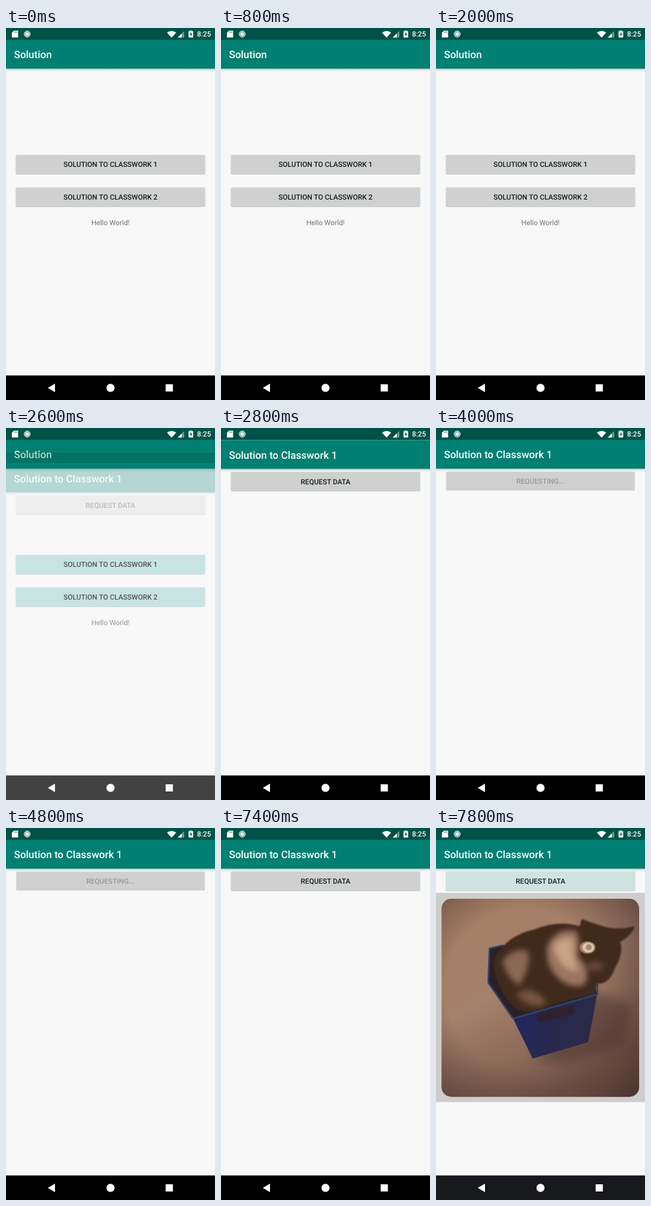
An HTML page that plays this animation: 320 px wide and 568 px high, repeating every 8 s.

```html
<!DOCTYPE html>
<html lang="en">
<head>
<meta charset="utf-8">
<title>Classwork app</title>
<style>
  html, body { margin: 0; width: 100%; height: 100%; overflow: hidden; background: #f8f8f8; }
  svg { display: block; width: 100vw; height: 100vh; }
  text { font-family: Roboto, "Noto Sans", sans-serif; font-size: 10.89px; text-rendering: geometricPrecision; }
  .title { font-size: 15.7px; font-weight: 500; fill: #fff; }
  .label { font-weight: 500; text-anchor: middle; fill: #141c1e; }
  .plain { text-anchor: middle; fill: #707373; }
  .clock { font-weight: 500; fill: #fff; }
</style>
</head>
<body>
<svg viewBox="0 0 320 568">
  <defs>
    <linearGradient id="barShadow" x2="0" y2="1">
      <stop stop-color="#000" stop-opacity=".26"/>
      <stop offset=".4" stop-color="#000" stop-opacity=".08"/>
      <stop offset="1" stop-color="#000" stop-opacity="0"/>
    </linearGradient>
    <linearGradient id="carpet" x2=".5" y2="1">
      <stop stop-color="#a47d62"/>
      <stop offset=".5" stop-color="#a5806a"/>
      <stop offset="1" stop-color="#7a594c"/>
    </linearGradient>
    <radialGradient id="vignette" cx=".42" cy=".45" r=".8">
      <stop offset=".5" stop-color="#321f20" stop-opacity="0"/>
      <stop offset="1" stop-color="#321f20" stop-opacity=".65"/>
    </radialGradient>
    <linearGradient id="bin" x2="1" y2=".3">
      <stop stop-color="#252566"/>
      <stop offset=".55" stop-color="#272850"/>
      <stop offset="1" stop-color="#2b2a46"/>
    </linearGradient>
    <filter id="soft" x="-30%" y="-30%" width="160%" height="160%"><feGaussianBlur stdDeviation="9"/></filter>
    <filter id="fur" x="-20%" y="-20%" width="140%" height="140%"><feGaussianBlur stdDeviation="1.2"/></filter>
    <filter id="tuft" x="-40%" y="-40%" width="180%" height="180%"><feGaussianBlur stdDeviation="4"/></filter>
    <clipPath id="photoFrame"><rect x="8.5" y="108" width="302.5" height="302.5" rx="15"/></clipPath>
  </defs>

  <g id="home"></g>
  <rect id="navBack" y="530.5" width="320" height="37.5" fill="#000"/>
  <g id="detail"></g>
  <g id="photo">
    <rect y="99" width="320" height="319.5" fill="#cfcdcb"/>
    <g clip-path="url(#photoFrame)">
      <rect x="8" y="108" width="304" height="304" fill="url(#carpet)"/>
      <rect x="8" y="108" width="304" height="304" fill="url(#vignette)"/>
      <path d="M240 250L300 270L290 330L200 360L150 356Z" fill="#3a2728" opacity=".45" filter="url(#soft)"/>
      <path d="M82 184L104 179L240 232L247 254L118 291L80 236Z" fill="#2b2028"/>
      <path d="M89 200Q108 164 150 155Q188 140 220 150L223 139L246 147Q276 158 304 150Q300 164 282 174Q288 190 274 214Q266 238 247 238L242 254Q190 264 150 280Q118 284 103 252Q86 226 89 200Z" fill="#40291f" filter="url(#fur)"/>
      <g filter="url(#tuft)">
        <path d="M172 176Q188 151 215 158Q222 176 217 196Q240 218 226 240Q196 246 178 218Q166 198 172 176Z" fill="#9c7660"/>
        <path d="M180 180Q194 164 210 170Q208 198 218 218Q190 218 180 180Z" fill="#c8a284"/>
        <path d="M102 202Q120 182 141 188Q145 212 128 240Q108 230 102 202Z" fill="#8a6852"/>
        <path d="M123 254Q146 236 170 267Q146 280 123 254Z" fill="#76543f"/>
        <ellipse cx="244" cy="211" rx="12" ry="7" fill="#6b4a3a"/>
      </g>
      <ellipse cx="232" cy="182.5" rx="12" ry="9.5" fill="#a58068"/>
      <ellipse cx="233" cy="182.5" rx="9" ry="7.5" fill="#dcc6ae"/>
      <circle cx="234" cy="182" r="4.5" fill="#a5886f"/>
      <path d="M118 291L247 252L233 327L148 352Z" fill="url(#bin)"/>
      <path d="M118 291L80 236L82 184L103 179M118 291L247 254V236" fill="none" stroke="#2f4468" stroke-width="2.5" stroke-linejoin="round"/>
      <rect x="154" y="276" width="59" height="15" rx="6" transform="rotate(-14 183 284)" fill="#2e2230"/>
    </g>
  </g>

  <g fill="#fff">
    <rect width="320" height="18" fill="#005248"/>
    <path d="M12.2 4H18.5V14.5H9V7.2Z"/>
    <path d="M12.8 5.2V7.2M14.6 5.2V7.2M16.4 5.2V7.2" stroke="#005248" stroke-width=".8"/>
    <circle cx="32.5" cy="9.3" r="4.7" fill="#7fa9a3" stroke="#e2ecea"/>
    <circle cx="32.5" cy="9.3" r="2.8" fill="#e2ecea"/>
    <path d="M246.5 7Q253.5 2 260.5 7L253.5 14.8Z"/>
    <path d="M273 4.5V14.5H263Z" opacity=".4"/>
    <path d="M269 8.5V14.5H263Z"/>
    <path d="M281.5 4.8V3.8H284.5V4.8H286.5V14.5H279.5V4.8Z"/>
    <path d="M283.7 6L281 10H282.7V13L285.2 9H283.7Z" fill="#005248"/>
    <text class="clock" x="292.5" y="13.2">8:25</text>
    <path d="M75 543V556L64 549.5Z"/>
    <circle cx="160" cy="549.5" r="6.2"/>
    <rect x="244.5" y="544" width="11" height="11"/>
  </g>
</svg>
<script>
const LOOP = 8000, STEP = 200;
const $ = id => document.getElementById(id);

const button = (id, y, label) => `
  <g id="${id}">
    <g class="shadow">
      <rect x="14.5" y="${y - .5}" width="291" height="30" rx="2" fill="#d3e4e4"/>
      <rect x="15.5" y="${y + 27.6}" width="289" height="1.8" rx="1" fill="#b9c8c9"/>
    </g>
    <rect class="face" x="15.5" y="${y}" width="289" height="28.6" rx="1.5" fill="#d0d0d0"/>
    <text class="label" x="160" y="${y + 18.4}">${label}</text>
  </g>`;

const screen = (title, content) => `
  <rect width="320" height="568" fill="#f8f8f8"/>
  <rect y="62" width="320" height="5" fill="url(#barShadow)"/>
  ${content}
  <rect width="320" height="18" fill="#005248"/>
  <rect y="18" width="320" height="44" fill="#008072"/>
  <text class="title" x="12.2" y="46.2">${title}</text>`;

$("home").innerHTML = screen("Solution",
  button("first", 194, "SOLUTION TO CLASSWORK 1") +
  button("second", 243.8, "SOLUTION TO CLASSWORK 2") +
  '<text class="plain" x="160" y="300.8">Hello World!</text>');
$("detail").innerHTML = screen("Solution to Classwork 1", button("request", 66.8, "REQUEST DATA"));

const part = (id, selector) => $(id).querySelector(selector);
const face = id => part(id, ".face");
const requestLabel = part("request", "text");
const between = (t, from, to) => t >= from && t < to;
const decelerate = (t, duration, power) =>
  1 - (1 - Math.min(1, Math.max(0, t / duration))) ** power;

function render(time) {
  const t = Math.floor(time / STEP) * STEP;
  const opening = t - 2585;
  const opened = opening >= STEP;
  const waiting = between(t, 4000, 7400);
  const loaded = t >= 7600;

  $("detail").setAttribute("opacity", decelerate(opening, 200, 4));
  $("detail").setAttribute("transform", `translate(0 ${45.4 * (1 - decelerate(opening, 350, 5))})`);

  const homeFace = opening > 0 ? "#b6ddda" : "#d0d0d0";
  face("first").setAttribute("fill", between(t, 2200, 2600) ? "#c6c8c8" : homeFace);
  face("second").setAttribute("fill", homeFace);

  requestLabel.textContent = waiting ? "REQUESTING..." : "REQUEST DATA";
  requestLabel.style.fill = waiting ? "#8f9a9a" : "";
  part("request", ".shadow").setAttribute("visibility", waiting ? "hidden" : "inherit");
  face("request").setAttribute("fill",
    loaded ? "#cfe4e1" : between(t, 3800, 4000) ? "#c6c8c8" : "#d0d0d0");

  $("photo").setAttribute("visibility", loaded ? "visible" : "hidden");
  $("navBack").setAttribute("fill", loaded ? "#18191c" : "#000");
  // Once open, the new window sits behind the navigation bar.
  $(opened ? "detail" : "home").after($("navBack"));
}

function tick(now) {
  render(now % LOOP);
  requestAnimationFrame(tick);
}
render(0);
requestAnimationFrame(tick);
</script>
</body>
</html>
```
